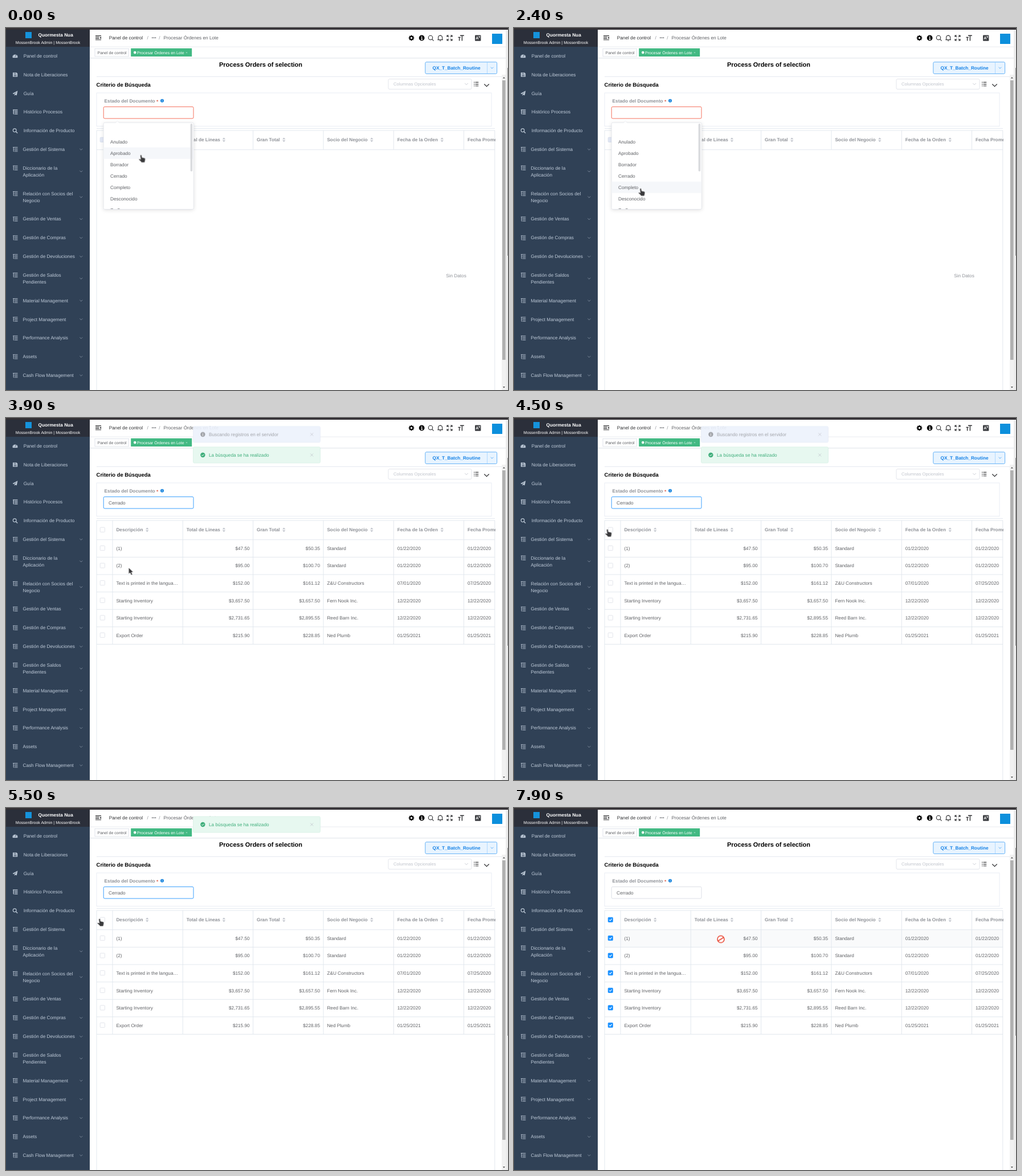
An HTML page that plays this animation: 881 by 636 pixels, repeating every 8 s.

```html
<!DOCTYPE html>
<html lang="es">
<head>
<meta charset="utf-8">
<title>Procesar Órdenes en Lote</title>
<style>
html, body { margin: 0; width: 100%; height: 100%; overflow: hidden; background: #fff; }
svg { position: fixed; left: 0; top: 0; width: 881px; height: 636px; }
text { font: 8.23px "Liberation Sans", Arial, sans-serif; text-rendering: geometricPrecision; fill: #606266; white-space: pre; }
.b { font-weight: 700; }
.s { font-size: 7.06px; }
.m { font-size: 7.64px; fill: #c0c4cc; }
.h { font-size: 9.41px; fill: #000; }
.title { font-size: 11px; fill: #000; }
.side { fill: #bfcbd9; }
.w { fill: #fff; }
.dark { fill: #303133; }
.grey { fill: #909399; }
.blue { fill: #1682e6; }
.mid { text-anchor: middle; }
.end { text-anchor: end; }
.ln { fill: none; stroke: #dfe6ec; }
.ic { fill: none; stroke: #303133; stroke-width: 1.1; }
.sic { fill: none; stroke: #bfcbd9; }

.anim, .box { animation: 8s step-end infinite; }
.empty { animation-name: empty; }
.list { animation-name: list; }
.load { animation-name: load; }
.rows { animation-name: rows; }
.field { animation-name: field; }
.value { animation-name: list-off; }
.caret { animation-name: caret; }
.pick { animation-name: pick; }
.box { fill: #fff; stroke: #dcdfe6; stroke-width: .8; animation-name: box; }
.all { animation-name: all; }
.ticks { animation-name: ticks; }
.hover { animation-name: hover; }
.info { animation-name: info; }
.done { animation-name: done; }
.cursor { animation-name: cursor; }
.hand { animation-name: hand; }
.arrow { animation-name: arrow; }
.stop { animation-name: hover; }

@keyframes empty { 0% { opacity: 1 } 46.25% { opacity: 0 } }
@keyframes list { 0% { opacity: 1 } 41.25% { opacity: 0 } }
@keyframes list-off { 0% { opacity: 0 } 41.25% { opacity: 1 } }
@keyframes load { 0% { opacity: 0 } 41.25% { opacity: 1 } 46.25% { opacity: 0 } }
@keyframes rows { 0% { opacity: 0 } 46.25% { opacity: 1 } }
@keyframes field { 0% { stroke: #f4705c } 41.25% { stroke: #3a9ffc } 78.75% { stroke: #dcdfe6 } }
@keyframes caret {
  0% { opacity: 0 } 2.5% { opacity: 1 } 8.75% { opacity: 0 } 15% { opacity: 1 }
  17.5% { opacity: 0 } 20% { opacity: 1 } 25% { opacity: 0 }
}
@keyframes pick {
  0% { transform: translateY(40px) } 8.75% { transform: translateY(60px) }
  13.75% { transform: translateY(80px) } 15% { transform: translateY(60px) }
  16.25% { transform: translateY(20px) } 20% { transform: translateY(40px) }
  21.25% { transform: translateY(60px) } 23.75% { transform: translateY(80px) }
  25% { transform: translateY(100.2px) }
}
@keyframes box { 0% { fill: #fff; stroke: #dcdfe6 } 87.5% { fill: #1890ff; stroke: #1890ff } }
@keyframes all {
  0% { fill: #e4eaf7; stroke: #d5dcea } 46.25% { fill: #fff; stroke: #dcdfe6 }
  78.75% { fill: #fff; stroke: #1890ff } 87.5% { fill: #1890ff; stroke: #1890ff }
}
@keyframes ticks { 0% { opacity: 0 } 87.5% { opacity: 1 } }
@keyframes hover { 0% { opacity: 0 } 98.75% { opacity: 1 } }
@keyframes info {
  0% { opacity: 0; transform: translateY(0) }
  41.25% { opacity: .65; transform: translateY(18.5px) }
  43.75% { opacity: .92; transform: translateY(28.8px) }
  62.5% { opacity: .25; transform: translateY(15px) }
  66.25% { opacity: 0 }
}
@keyframes done {
  0% { opacity: 0; transform: translateY(30px) }
  46.25% { opacity: .55; transform: translateY(52px) }
  48.75% { opacity: 1; transform: translateY(65px) }
  62.5% { transform: translateY(51.2px) }
  66.25% { transform: translateY(31px) }
  68.75% { transform: translateY(29px) }
  78.75% { opacity: .65; transform: translateY(20px) }
  80% { opacity: .1; transform: translateY(6px) }
  82.5% { opacity: 0 }
}
@keyframes hand { 0% { opacity: 1 } 41.25% { opacity: 0 } 53.75% { opacity: 1 } 88.75% { opacity: 0 } }
@keyframes arrow { 0% { opacity: 0 } 41.25% { opacity: 1 } 53.75% { opacity: 0 } 88.75% { opacity: 1 } 98.75% { opacity: 0 } }
@keyframes cursor {
  0% { transform: translate(232.5px, 222.5px) }
  2.5% { transform: translate(231px, 220px) }
  6.25% { transform: translate(231.5px, 222px) }
  7.5% { transform: translate(232px, 226px) }
  8.75% { transform: translate(232px, 232px) }
  10% { transform: translate(231px, 240px) }
  11.25% { transform: translate(230px, 246px) }
  12.5% { transform: translate(229px, 249px) }
  13.75% { transform: translate(228.3px, 250.5px) }
  15% { transform: translate(224px, 234px) }
  16.25% { transform: translate(219px, 209px) }
  17.5% { transform: translate(218px, 207px) }
  20% { transform: translate(217px, 215px) }
  21.25% { transform: translate(217px, 231px) }
  22.5% { transform: translate(217px, 248px) }
  23.75% { transform: translate(217px, 265px) }
  25% { transform: translate(217.3px, 279px) }
  30% { transform: translate(217.8px, 281.3px) }
  41.25% { transform: translate(216px, 262px) }
  46.25% { transform: translate(215.3px, 263px) }
  50% { transform: translate(205px, 257.5px) }
  52.5% { transform: translate(183px, 232px) }
  53.75% { transform: translate(163px, 201px) }
  56.25% { transform: translate(159.5px, 195px) }
  58.75% { transform: translate(159.7px, 194px) }
  78.75% { transform: translate(164.5px, 194.3px) }
  88.75% { transform: translate(313.5px, 163.5px) }
  91.25% { transform: translate(529.5px, 169.5px) }
  96.25% { transform: translate(563.5px, 197px) }
  98.75% { transform: translate(363px, 230.5px) }
}
</style>
</head>
<body>
<svg id="stage" viewBox="0 0 881 636"></svg>
<script>
const txt = (x, y, s, c = '') => `<text x="${x}" y="${y}" dy=".35em" class="${c}">${s}</text>`;
const rect = (x, y, w, h, a = '') => `<rect x="${x}" y="${y}" width="${w}" height="${h}" ${a}/>`;
const path = (d, a = '') => `<path d="${d}" ${a}/>`;
const circle = (x, y, r, a = '') => `<circle cx="${x}" cy="${y}" r="${r}" ${a}/>`;
const group = (a, ...parts) => `<g ${a}>${parts.join('')}</g>`;
const chevron = (x, y, r, a) => path(`M${x - r} ${y - r / 2}l${r} ${r} ${r} ${-r}`, `fill="none" ${a}`);
const at = (x, y, ...parts) => group(`transform="translate(${x} ${y})"`, ...parts);

// Sidebar
const tree = w => path('M-4-3.6H4.5M-.8-1.2H4.5M-.8 1.2H4.5M-.8 3.6H4.5M-2.8-3.6V3.6M-2.8-.1h1.2M-2.8 3.6h1.2', `class="sic" stroke-width="${w}"`);
const sideIcons = [
  path('M-4.3 3.4A4.5 4.5 0 1 1 4.3 3.4Z', 'fill="#bfcbd9"') + path('M0 2L1.5-2M-3 .5h.8M2.3.5H3M-1.6-2.4l.5.5', 'stroke="#304156" stroke-width=".8"'),
  path('M-4-3.8H2.5L4.2-2V3.8H-4Z', 'fill="#bfcbd9"') + path('M-2.4-2.2H1.8M-2.4.4H2.6M-2.4 2.2H2.6', 'stroke="#304156" stroke-width=".9"'),
  path('M4.4-4.4L-4.5.4l2.2 1.1L3-2.8-1.2 2V4.4L.4 2.6 2.8 3.7Z', 'fill="#bfcbd9"'),
  tree(1.3),
  circle(-.8, -.8, 2.9, 'class="sic" stroke-width="1.1"') + path('M1.4 1.4L4.2 4.2', 'class="sic" stroke-width="1.3"')
];
const links = [['Panel de control', 48.9], ['Nota de Liberaciones', 82], ['Guía', 114.7], ['Histórico Procesos', 147.5], ['Información de Producto', 180.6]];
const menus = [
  [213.2, 'Gestión del Sistema'], [251.8, 'Diccionario de la', 'Aplicación'],
  [297, 'Relación con Socios del', 'Negocio'], [335.6, 'Gestión de Ventas'],
  [368.6, 'Gestión de Compras'], [401.5, 'Gestión de Devoluciones'],
  [440, 'Gestión de Saldos', 'Pendientes'], [479, 'Material Management'],
  [511.7, 'Project Management'], [544.6, 'Performance Analysis'],
  [577.5, 'Assets'], [610.2, 'Cash Flow Management']
];
const sidebar = [
  rect(0, 3, 147, 633, 'fill="#304156"'),
  rect(0, 3, 147, 30, 'fill="#2b2f3a"'),
  rect(34, 7, 11, 11, 'fill="#1593dc"'),
  txt(56.5, 12.4, 'Quormesta Nua', 'b w'),
  txt(73.5, 26, 'MossenBrook Admin | MossenBrook', 's w mid'),
  ...links.map(([s, y], i) => at(16, y, sideIcons[i]) + txt(30.7, y, s, 'side')),
  ...menus.map(([y, a, b]) => {
    const top = b ? y - 6 : y;
    return at(16, top, tree(.9)) + txt(29.5, top, a, 'side') + (b ? txt(29.5, y + 6, b, 'side') : '') +
      chevron(131.8, y, 2.4, 'stroke="#8f9bab" stroke-width=".8"');
  })
];

// Top bar and tabs
const teeth = [0, 45, 90, 135].map(a => rect(-1, -4.8, 2, 9.6, `transform="rotate(${a})"`)).join('');
const header = [
  rect(147, 32.6, 734, 1, 'fill="#e9ecf0"'),
  rect(147, 52.4, 730, 1, 'fill="#dde1e8"'),
  path('M157 13.6h10M157 16h6.5M157 18.4h6.5M157 20.8h10', 'class="ic"') + path('M167 15v4.4l-2.4-2.2Z', 'fill="#303133"'),
  txt(180.8, 17.4, 'Panel de control', 'dark'),
  txt(247.6, 17.4, '/', 'grey'), txt(268.2, 17.4, '/', 'grey'),
  [256.8, 259.6, 262.4].map(x => circle(x, 17.2, .85, 'fill="#505359"')).join(''),
  txt(276.5, 17.4, 'Procesar Órdenes en Lote'),
  at(711.5, 17.5, teeth, circle(0, 0, 2.7, 'fill="#fff" stroke="#000" stroke-width="2"')),
  circle(729.6, 17.5, 4.9), path('M729.7 14.2v1.5M728.6 16.8h1.2v3.6M728.4 20.4h2.8', 'fill="none" stroke="#fff" stroke-width="1.2"'),
  circle(745, 17, 3.7, 'class="ic"'), path('M747.6 19.6l3 3', 'class="ic" stroke-width="1.5"'),
  path('M757.4 20.6h9.4M758.6 20.4v-3.6a3.5 3.5 0 0 1 7 0v3.6M762.1 13.2v-1.2M761 22.5h2.2', 'class="ic"'),
  path('M774 16v-3h3M774 13l3.2 3.2M783 16v-3h-3M783 13l-3.2 3.2M774 19v3h3M774 22l3.2-3.2M783 19v3h-3M783 22l-3.2-3.2', 'class="ic"'),
  path('M797 13.2h6.8M800.4 13.2v9.4M793.4 16.4h4.4M795.6 16.4v6', 'class="ic" style="stroke-width:1.4"'),
  rect(823, 12.4, 10.4, 10.4, 'rx="1" fill="#3c3e42"'), txt(824.2, 18, 'A', 's b w'),
  path('M829.2 14.8h3.2M829.6 17.4l2.4-2.6M829.6 14.8l2.4 2.8', 'stroke="#fff" stroke-width=".7"'),
  rect(853, 10, 18, 18, 'fill="#0c8fdc"'),
  rect(156, 36.3, 59.3, 13.6, 'fill="#fff" stroke="#d8dce5" stroke-width=".8"'),
  txt(160.5, 43.3, 'Panel de control', 's'),
  rect(219.2, 35.7, 107, 14.4, 'fill="#42b983"'),
  circle(226.2, 43.1, 2.3, 'fill="#fff"'),
  txt(230, 43.3, 'Procesar Órdenes en Lote', 's w'),
  path('M316 42.3l2 2m0-2l-2 2', 'stroke="#d5f0e4" stroke-width=".6"')
];

// Search form
const form = [
  txt(447, 64.2, 'Process Orders of selection', 'b title mid'),
  rect(735.8, 59.8, 125.8, 20.6, 'rx="2" fill="#e8f4ff" stroke="#55aaf7" stroke-width=".9"'),
  path('M844.5 60v20.2', 'stroke="#a3d3ff" stroke-width=".8"'),
  txt(790.5, 70, 'QX_T_Batch_Routine', 'b blue mid'),
  chevron(853, 70, 2.4, 'stroke="#3f9df5" stroke-width=".8"'),
  rect(159, 85, 712, .8, 'fill="#dfe4ed"'),
  txt(158.6, 99.3, 'Criterio de Búsqueda', 'b h'),
  rect(671, 89.7, 146, 17.8, 'rx="2" fill="#fff" stroke="#dcdfe6" stroke-width=".8"'),
  txt(680, 98.7, 'Columnas Opcionales', 'm'),
  chevron(808, 98.4, 2.8, 'stroke="#c0c4cc" stroke-width=".8"'),
  path('M821 95.4h1.4M821 98.6h1.4M821 101.8h1.4M823.6 95.4h5.6M823.6 98.6h5.6M823.6 101.8h5.6', 'class="ic"'),
  chevron(843.5, 100.6, 4.2, 'stroke="#303133" stroke-width="1.2"'),
  rect(159, 114, 693, 58.6, 'class="ln" stroke-width=".8" style="stroke:#e4e9f2"'),
  txt(172.6, 128.5, 'Estado del Documento', 'b grey'),
  txt(264, 128.8, '*', 'b" style="fill:#e0604c'),
  circle(274, 127.7, 3, 'fill="#1583dd"'), path('M274 125.9v.9M274 127.3v2.2', 'stroke="#fff" stroke-width=".8"'),
  rect(171.2, 138.4, 157.8, 20.6, 'rx="2" fill="#fff" stroke-width="1" class="anim field"'),
  txt(180, 148.8, 'Cerrado', 'anim value'),
  rect(181, 144, .8, 9.4, 'fill="#303133" class="anim caret"'),
  rect(159, 176, 699, .8, 'fill="#dfe4ed"')
];

// Table
const cols = [187, 310.3, 433.6, 557, 680.3, 803.5];
const heads = [['Descripción', 247.7], ['Total de Lineas', 382.4], ['Gran Total', 487.7], ['Socio del Negocio', 641.8], ['Fecha de la Orden', 765.2], ['Fecha Prometida', 0]];
const orders = [
  ['(1)', '$47.50', '$50.35', 'Standard', '01/22/2020', '01/22/2020'],
  ['(2)', '$95.00', '$100.70', 'Standard', '01/22/2020', '01/22/2020'],
  ['Text is printed in the langua…', '$152.00', '$161.12', 'Z&amp;U Constructors', '07/01/2020', '07/25/2020'],
  ['Starting Inventory', '$3,657.50', '$3,657.50', 'Fern Nook Inc.', '12/22/2020', '12/22/2020'],
  ['Starting Inventory', '$2,731.65', '$2,895.55', 'Reed Barn Inc.', '12/22/2020', '12/22/2020'],
  ['Export Order', '$215.90', '$228.85', 'Ned Plumb', '01/25/2021', '01/25/2021']
];
const rowY = i => 229 + 30.58 * i;
const check = (y, c = '') => rect(165.2, y - 4.1, 8.2, 8.2, `rx="1" class="box ${c}"`);
const tick = y => path(`M167.2 ${y}l1.6 1.7 2.8-3.3`, 'fill="none" stroke="#fff" stroke-width="1.1"');
const sort = x => path(`M${x - 2.7} 195.5l2.7-3 2.7 3ZM${x - 2.7} 197.2l2.7 3 2.7-3Z`, 'fill="#c0c4cc"');
const cell = (s, c, y) => c === 1 || c === 2 ? txt(cols[c + 1] - 6, y, s, 'end') : txt(cols[c] + 6.4, y, s);
const columnLines = (a, b) => cols.map(x => `M${x} ${a}V${b}`).join('');

const table = group('clip-path="url(#table)"',
  rect(159, 213.8, 699, 30.6, 'fill="#f9fafb" class="anim hover"'),
  path('M159 180H858M159 213.8H858M159 180V636M857.8 180V636' + columnLines(180, 213.8), 'class="ln" stroke-width=".9"'),
  heads.map(([s, x], c) => txt(cols[c] + 6.4, 196.3, s, 'b grey') + (x ? sort(x) : '')).join(''),
  check(196.3, 'all'),
  txt(790, 435.3, 'Sin Datos', 'grey mid anim empty'),
  group('class="anim rows"',
    path(columnLines(213.8, 397.5) + orders.map((_, i) => `M159 ${(244.5 + 30.6 * i).toFixed(1)}H858`).join(''), 'class="ln" stroke-width=".9"'),
    orders.map((r, i) => check(rowY(i) - .4) + r.map((s, c) => cell(s, c, rowY(i))).join('')).join('')),
  group('class="anim ticks"', tick(196.3), orders.map((_, i) => tick(rowY(i) - .4)).join('')),
  group('class="anim load"',
    rect(159, 180, 699, 456, 'fill="#fff" fill-opacity=".9"'),
    circle(508.5, 437.5, 10, 'fill="none" stroke="#1890ff" stroke-width="1.2" stroke-dasharray="47 16"'))
);

// Status list
const states = ['', 'Anulado', 'Aprobado', 'Borrador', 'Cerrado', 'Completo', 'Desconocido', 'En Proceso'];
const list = group('class="anim list"',
  rect(171.2, 166.3, 158, 152.2, 'rx="2" fill="#fff" stroke="#e0e3e9" stroke-width=".8" filter="url(#shade)"'),
  path('M192 166.7l3.5-3.6 3.5 3.6', 'fill="#fff" stroke="#e4e7ed" stroke-width=".7"'),
  group('clip-path="url(#list)"',
    rect(171.6, 169.7, 157.2, 20.1, 'fill="#f5f7fa" class="anim pick"'),
    states.map((s, i) => txt(183, 179.6 + 20.03 * i, s)).join('')),
  rect(323.6, 168, 3.6, 84, 'rx="1.8" fill="#dadbde"')
);

// Notices, centred on y = 0
const notice = (name, fill, edge, ink, mark, s) => group(`class="anim ${name}"`,
  rect(328.5, -14.1, 223, 28.2, `rx="2" fill="${fill}" stroke="${edge}" stroke-width=".7"`),
  circle(345.4, 0, 4.2, `fill="${ink}"`), path(mark, 'fill="none" stroke="#fff" stroke-width="1"'),
  `<text x="356" y="0" dy=".35em" style="fill:${ink}">${s}</text>`,
  path('M534.2-2.5l5 5m0-5l-5 5', 'stroke="#c0c4cc" stroke-width=".8"'));
const notices = [
  notice('info', '#edf2fc', '#e4eaf5', '#999ca2', 'M345.4-2.3v1M345.4-.4v2.8', 'Buscando registros en el servidor'),
  notice('done', '#e7f8f0', '#d4f0e3', '#3fae7b', 'M343.4 0l1.5 1.5 2.6-2.7', 'La búsqueda se ha realizado')
];

const frame = [
  rect(870, 82, 7, 554, 'fill="#f1f1f1"'),
  rect(871, 92, 5.6, 491, 'fill="#b0b0b0"'),
  path('M872 88.5l1.9-2.4 1.9 2.4ZM872 630l1.9 2.4 1.9-2.4Z', 'fill="#505050"'),
  rect(877, 3, 4, 633, 'fill="#ececec"'),
  rect(880, 70, 1, 330, 'fill="#8c8c8c"'),
  rect(0, 0, 881, 3, 'fill="#343135"')
];

const cursor = group('class="anim cursor"',
  path('M4 .5Q5.2 0 5.6 1.5L6.2 5 10 5.8Q12.2 6.2 12 8L11.6 10.5 10.8 13.8H5L4.2 12 .8 9Q.3 7.4 1.8 7.4L4 8.4 3 2Q3 .8 4 .5Z', 'fill="#3a3a3c" stroke="#fff" stroke-width=".5" class="anim hand"'),
  path('M0 0V11L2.5 8.8 4.5 13 6.6 12 4.8 8 8 7.7Z', 'fill="#3a3a3c" stroke="#fff" stroke-width=".5" class="anim arrow"'),
  group('class="anim stop" fill="none" stroke="#e8432f" stroke-width="1.5"', circle(0, 0, 6, 'fill="#fff"'), path('M-4.8 3L4.8-3')));

const defs = `<defs>
  <clipPath id="table">${rect(158.5, 179.5, 699.7, 457)}</clipPath>
  <clipPath id="list">${rect(171.2, 166.5, 158, 151.4)}</clipPath>
  <filter id="shade" x="-10%" y="-10%" width="120%" height="120%"><feDropShadow dx="0" dy="1.2" stdDeviation="3" flood-opacity=".12"/></filter>
</defs>`;

document.getElementById('stage').innerHTML =
  [defs, ...header, ...form, table, list, ...sidebar, ...notices, ...frame, cursor].join('');
</script>
</body>
</html>
```
